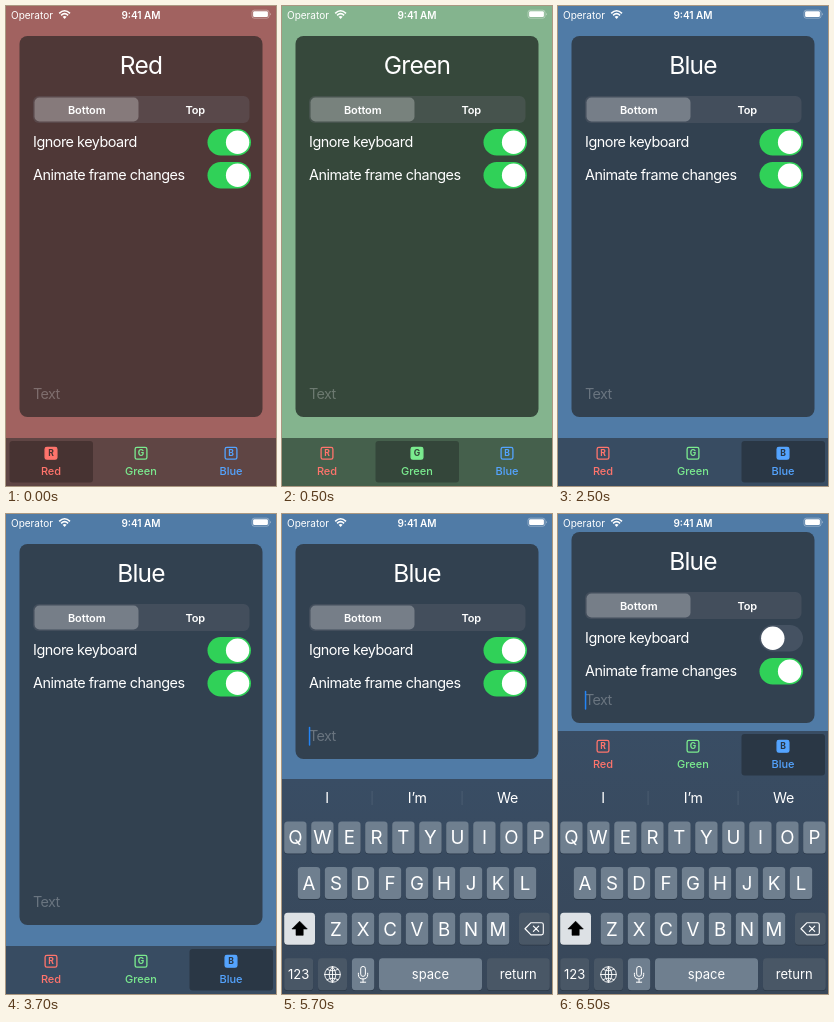
An HTML page that plays this animation: 270x480 px, repeating every 8 s.

```html
<!DOCTYPE html>
<html lang="en">
<head>
<meta charset="utf-8">
<title>Keyboard layout demo</title>
<style>
html, body { margin: 0; width: 100%; height: 100%; overflow: hidden; background: #507ba6; }
svg { display: block; width: 100%; height: 100%; }
text { font-family: Inter, "Liberation Sans", sans-serif; fill: #fff; white-space: pre; }
.title { font-size: 24.5px; letter-spacing: -.75px; }
.body { font-size: 14.4px; letter-spacing: -.48px; }
.hint { font-size: 14.4px; letter-spacing: -.6px; fill-opacity: .27; }
.seg { font-size: 11px; font-weight: 600; letter-spacing: -.1px; }
.tab { font-size: 11px; font-weight: 500; }
.badge { font-size: 8.6px; font-weight: 700; }
.status { font-size: 10px; }
.clock { font-size: 10px; font-weight: 600; }
.word { font-size: 14.2px; letter-spacing: -.2px; }
.letter { font-size: 18.7px; }
.cap { font-size: 13px; }
</style>
</head>
<body>
<svg id="stage" viewBox="0 0 270 480" preserveAspectRatio="none" xmlns="http://www.w3.org/2000/svg"></svg>
<script>
const stage = document.getElementById('stage');
const LOOP = 8000;

const themes = {
  Red:   { bg: '#a16260', card: '#4f3837', bar: '#5f4544', active: '#473332', tint: '#ff746c' },
  Green: { bg: '#84b48e', card: '#36483b', bar: '#45604c', active: '#34463a', tint: '#7beb8f' },
  Blue:  { bg: '#507ba6', card: '#324150', bar: '#384c62', active: '#2a3745', tint: '#54a4ff' }
};

const open = { top: 30, bottom: 411, hint: 393, tabs: 432 };
const scenes = [
  { at: 0, name: 'Red', ...open },
  { at: 500, name: 'Green', ...open },
  { at: 2500, name: 'Blue', ...open },
  { at: 4500, name: 'Blue', top: 30, bottom: 245, hint: 227, keys: true },
  { at: 6500, name: 'Blue', top: 18, bottom: 209, hint: 191, tabs: 217, keys: true, inset: true }
];

const rect = (x, y, w, h, r, fill, more = '') =>
  `<rect x="${x}" y="${y}" width="${w}" height="${h}" rx="${r}" fill="${fill}" ${more}/>`;
const text = (x, y, cls, str, anchor = 'middle', more = '') =>
  `<text x="${x}" y="${y}" class="${cls}" text-anchor="${anchor}" ${more}>${str}</text>`;
const line = (d, width = 1.2, more = '') =>
  `<path d="${d}" fill="none" stroke="#fff" stroke-width="${width}" stroke-linecap="round" stroke-linejoin="round" ${more}/>`;

function statusBar() {
  return text(5, 12.5, 'status', 'Operator', 'start') +
    line('M53.2 7.3Q58.6 2.2 64 7.3M55.1 9.3Q58.6 6 62.1 9.3', 1.6, 'style="stroke-linecap:butt"') +
    '<path d="M56.6 10.8Q58.6 9 60.6 10.8L58.6 12.9Z" fill="#fff"/>' +
    text(135, 12.5, 'clock', '9:41 AM') +
    rect(246, 4.2, 17, 8, 2.2, 'none', 'stroke="#fff" stroke-opacity=".5" stroke-width=".7"') +
    rect(247.1, 5.3, 14.8, 5.8, 1.3, '#fff') +
    '<path d="M264 6.8Q265.6 8.2 264 9.6Z" fill="#fff" fill-opacity=".55"/>';
}

function toggle(y, on) {
  return rect(201.5, y, 43.5, 26.5, 13.25, on ? '#30d158' : '#455262') +
    `<circle cx="${on ? 231.6 : 214.8}" cy="${y + 13.25}" r="11.7" fill="#fff"/>`;
}

function card(s, t) {
  const y = s.top;
  return rect(13.5, y, 243, s.bottom - y, 8, t.card) +
    text(135, y + 38.3, 'title', s.name) +
    rect(27, y + 60, 216.5, 27, 6, '#767680', 'fill-opacity=".26"') +
    rect(28.5, y + 61.6, 104, 23.8, 5, '#fff', 'fill-opacity=".27"') +
    text(80.7, y + 77.5, 'seg', 'Bottom') +
    text(189.3, y + 77.5, 'seg', 'Top') +
    text(27, y + 111.2, 'body', 'Ignore keyboard', 'start') +
    text(27, y + 144.2, 'body', 'Animate frame changes', 'start') +
    toggle(y + 93, !s.inset) +
    toggle(y + 126, true) +
    text(27, s.hint, 'hint', 'Text', 'start') +
    (s.keys ? rect(26.8, s.hint - 14.2, 1.5, 19, .7, '#2384f5') : '');
}

function tabBar(s, t) {
  const y = s.tabs;
  let out = s.keys ? '' : rect(0, y, 270, 48, 0, t.bar);
  Object.keys(themes).forEach((name, i) => {
    const { tint } = themes[name], x = 45 + 90 * i, on = name === s.name;
    if (on) out += rect(x - 41.5, y + 3, 83.5, 41.5, 3, t.active);
    out += rect(x - 5.9, y + 9.4, 11.8, 11.8, 1.8, on ? tint : 'none', `stroke="${tint}" stroke-width="1.3"`) +
      text(x, y + 18.4, 'badge', name[0], 'middle', `style="fill:${on ? t.active : tint}"`) +
      text(x, y + 36.6, 'tab', name, 'middle', `style="fill:${tint}"`);
  });
  return out;
}

const LIGHT = '#6f7f8f', DARK = '#495766';

function key(x, y, w, fill) {
  return rect(x, y + .8, w, 32, 3.5, '#1f2934', 'fill-opacity=".55"') + rect(x, y, w, 32, 3.5, fill);
}

function keyboard(top) {
  let out = '<defs><linearGradient id="panel" x1="0" y1="0" x2="0" y2="1">' +
    '<stop offset="0" stop-color="#394d64"/><stop offset="1" stop-color="#384759"/></linearGradient></defs>' +
    rect(0, top, 270, 480 - top, 0, 'url(#panel)');
  ['I', 'I’m', 'We'].forEach((w, i) => out += text(45 + 90.3 * i, 289, 'word', w));
  [90, 180].forEach(x => out += rect(x - .3, 277, .7, 14, 0, '#fff', 'fill-opacity=".14"'));

  [['QWERTYUIOP', 2.2], ['ASDFGHJKL', 15.8], ['ZXCVBNM', 42.8]].forEach(([row, x0], r) => {
    const y = 307.5 + 45.6 * r;
    [...row].forEach((ch, i) => {
      const x = x0 + 27 * i;
      out += key(x, y, 22.4, LIGHT) + text(x + 11.2, y + 22.9, 'letter', ch);
    });
  });

  out += key(2.2, 398.7, 30.8, '#dde1e5') +
    '<path d="M17.6 407.2L25.3 415H21.2V421.3H14V415H9.9Z" fill="#000" stroke="#000" stroke-width=".6" stroke-linejoin="round"/>' +
    key(237, 398.7, 30.8, DARK) +
    line('M249 408.7H259.4Q261.3 408.7 261.3 410.6V418.9Q261.3 420.8 259.4 420.8H249L243 414.75ZM251.4 412.1L256.7 417.4M256.7 412.1L251.4 417.4', 1.15);

  const y = 444.3;
  out += key(2.2, y, 29, DARK) + text(16.7, 465.4, 'cap', '123') +
    key(36, y, 29, DARK) +
    line('M42.7 460.5a7.8 7.8 0 1 0 15.6 0a7.8 7.8 0 1 0 -15.6 0M50.5 452.7V468.3M42.7 460.5H58.3' +
      'M50.5 452.7Q43.6 460.5 50.5 468.3Q57.4 460.5 50.5 452.7M45 455.2Q50.5 458.6 56 455.2M45 465.8Q50.5 462.4 56 465.8', .9) +
    key(69.9, y, 22.3, LIGHT) +
    rect(78.7, 452.4, 4.7, 10, 2.35, 'none', 'stroke="#fff" stroke-width="1"') +
    line('M76.4 459.2V460.5Q76.4 465 81.05 465Q85.7 465 85.7 460.5V459.2M81.05 465V468.2M78.4 468.2H83.7', 1) +
    key(97, y, 103, LIGHT) + text(148.5, 465, 'cap', 'space') +
    key(205, y, 62.8, DARK) + text(236.2, 465, 'cap', 'return');
  return out;
}

function draw(s) {
  const t = themes[s.name];
  stage.innerHTML = rect(0, 0, 270, 480, 0, t.bg) + statusBar() + card(s, t) +
    (s.keys ? keyboard(s.tabs || 265) : '') +
    (s.tabs ? tabBar(s, t) : '');
}

let shown;
const begin = performance.now();
function tick() {
  const time = (performance.now() - begin) % LOOP;
  const scene = scenes.filter(s => s.at <= time).pop();
  if (scene !== shown) draw(shown = scene);
  requestAnimationFrame(tick);
}
tick();
</script>
</body>
</html>
```
